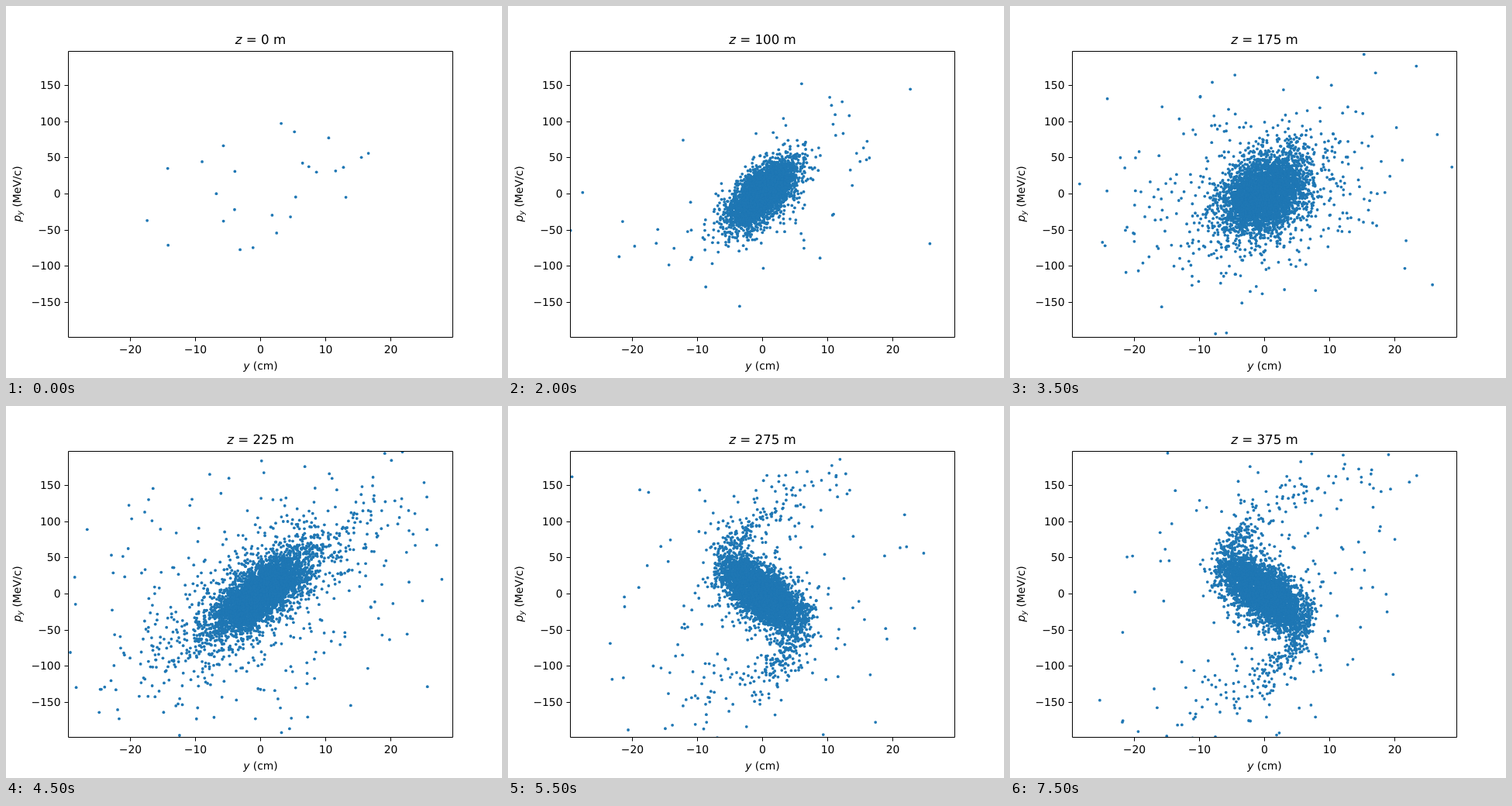
An HTML page with a canvas that plays this animation: 640x480 px, repeating every 8 s.

```html
<!DOCTYPE html>
<html lang="en">
<head>
<meta charset="utf-8">
<title>Phase space</title>
<style>
html, body { margin: 0; width: 640px; height: 480px; overflow: hidden; background: #fff; }
canvas, svg { position: absolute; left: 0; top: 0; }
text { font: 13.89px "DejaVu Sans", sans-serif; text-anchor: middle; text-rendering: geometricPrecision; white-space: pre; }
#title { font-size: 16.67px; }
.i { font-style: italic; }
.sub { font-size: 9.72px; }
.end { text-anchor: end; }
path { fill: none; stroke: #000; stroke-width: 1; }
</style>
</head>
<body>
<canvas id="plot" width="640" height="480"></canvas>
<svg id="axes" width="640" height="480">
  <text id="title" x="328.5" y="49"><tspan class="i">z</tspan> = <tspan id="z">0</tspan> m</text>
  <text x="328.5" y="469"><tspan class="i">y</tspan> (cm)</text>
  <text transform="translate(19 242.5) rotate(-90)"><tspan class="i">p</tspan><tspan class="i sub" dy="2.3">y</tspan><tspan dy="-2.3"> (MeV/c)</tspan></text>
</svg>
<script>
const STEP = 500, COUNT = 16, METRES = 25;
const CX = 328.5, CY = 242.5;
const TWIST = 2.3, TWIST_RADIUS = 66;
const ctx = document.getElementById("plot").getContext("2d");
const axes = document.getElementById("axes");
const zLabel = document.getElementById("z");

function randomizer(seed) {
  return () => {
    seed = (seed + 0x6D2B79F5) | 0;
    let t = Math.imul(seed ^ (seed >>> 15), 1 | seed);
    t = (t + Math.imul(t ^ (t >>> 7), 61 | t)) ^ t;
    return ((t ^ (t >>> 14)) >>> 0) / 4294967296;
  };
}

function smooth(t) {
  t = Math.min(1, Math.max(0, t));
  return t * t * (3 - 2 * t);
}

// Shape of the beam at distance z
function beamAt(z) {
  const wave = start => Math.cos(2 * Math.PI * (z - start) / 100);
  const spread = smooth((z - 140) / 85);
  const swell = Math.exp(-(((z - 150) / 18) ** 2));
  const tilt = z < 225 ? .27 + .38 * wave(100) : .7 * wave(225);
  const size = 21 + 3 * spread + 18 * swell;
  return {
    tilt,
    width: size * (1 + .15 * spread),
    height: size,
    mid: 100 + 400 * swell + spread * (650 + 250 * tilt),
    halo: 30 * smooth(z / 100) + spread * (230 + 150 * tilt)
  };
}

function cloud(random, count, width, height, tilt, twisted) {
  for (let i = 0; i < count; i++) {
    const r = Math.sqrt(-2 * Math.log(1 - random()));
    const a = 2 * Math.PI * random();
    const g = r * Math.cos(a), h = r * Math.sin(a);
    let x = width * g;
    let y = -height * (tilt * g + Math.sqrt(1 - tilt * tilt) * h);
    const radius = Math.hypot(x, y);
    // Outer particles lag behind, which bends the tails into an S
    if (twisted && radius > TWIST_RADIUS) {
      const angle = Math.atan2(y, x) + TWIST * (1 - TWIST_RADIUS / radius);
      x = radius * Math.cos(angle);
      y = radius * Math.sin(angle);
    }
    ctx.beginPath();
    ctx.arc(CX + x, CY + y, 1.9, 0, 2 * Math.PI);
    ctx.fill();
  }
}

function draw(step) {
  const z = step * METRES;
  const random = randomizer(step * 977 + 5);
  ctx.clearRect(0, 0, 640, 480);
  zLabel.textContent = z;
  if (z === 0) {
    cloud(random, 26, 95, 50, .65, false);
    return;
  }
  const { tilt, width, height, mid, halo } = beamAt(z);
  const twisted = tilt < -.5;
  cloud(random, 3800, width, height, tilt, twisted);
  cloud(random, mid, 66, 50, tilt * 1.1, twisted);
  cloud(random, halo, 120, 95, tilt * .4, twisted);
}

function add(tag, attributes, text = "") {
  const node = document.createElementNS("http://www.w3.org/2000/svg", tag);
  for (const name in attributes) node.setAttribute(name, attributes[name]);
  node.textContent = text;
  axes.append(node);
}

const signed = n => String(n).replace("-", "\u2212");
let lines = "M80.5 58.5H576.5V427.5H80.5Z";
for (let v = -20; v <= 20; v += 10) {
  const x = Math.floor(CX + v * 8.42) + .5;
  lines += `M${x} 427.5v5`;
  add("text", { x, y: 448 }, signed(v));
}
for (let v = -150; v <= 150; v += 50) {
  const y = Math.floor(CY - v * .934) + .5;
  lines += `M80.5 ${y}h-5`;
  add("text", { x: 70.5, y: y + 4.5, class: "end" }, signed(v));
}
add("path", { d: lines });

ctx.beginPath();
ctx.rect(80, 58, 496, 369);
ctx.clip();
ctx.fillStyle = "#1f77b4";

let shown = -1;
function tick() {
  const step = Math.floor(performance.now() / STEP) % COUNT;
  if (step !== shown) draw(shown = step);
  requestAnimationFrame(tick);
}
tick();
</script>
</body>
</html>
```
